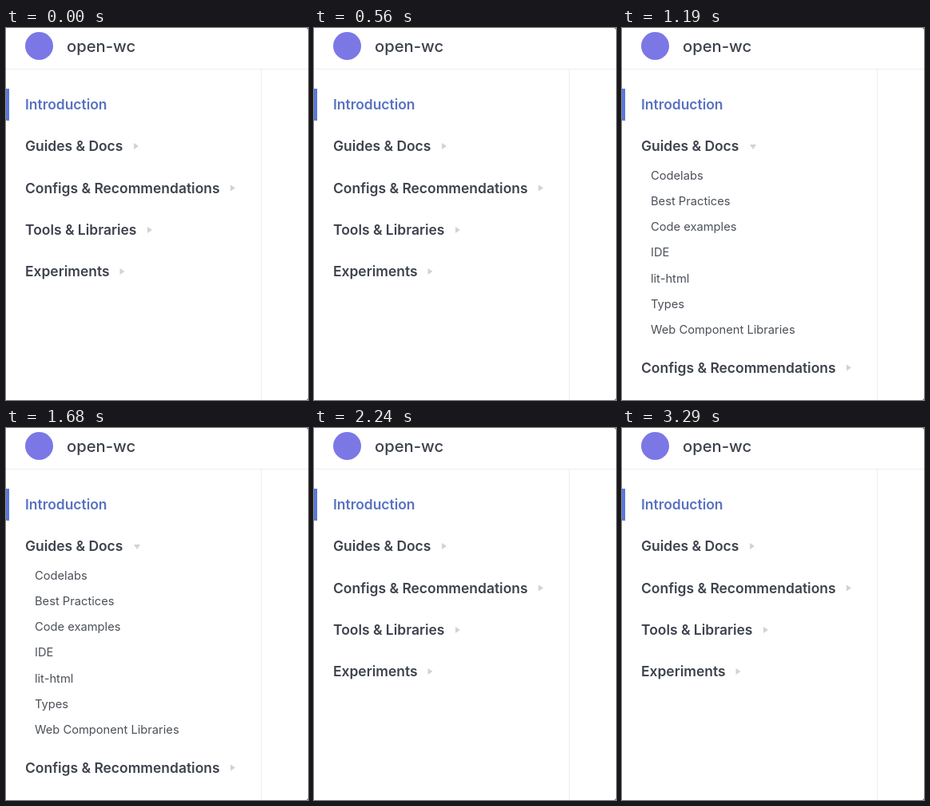
These frames come from a looping animation (378 by 466 pixels, 3.36 s). An HTML page with a canvas:

```html
<!DOCTYPE html>
<html lang="en">
<head>
<meta charset="utf-8">
<title>Sidebar menu</title>
<style>
  html, body { margin: 0; width: 100%; height: 100%; overflow: hidden; background: #fff; }
  canvas { display: block; width: 378px; height: 466px; }
</style>
</head>
<body>
<canvas id="stage"></canvas>
<script>
const W = 378, H = 466, LOOP = 3360;
const OPEN_AT = 1190, CLOSE_AT = 2240;
const FAMILY = 'Inter, "Open Sans", sans-serif';
const INK = '#3d424d', SUB_INK = '#4b5058', ACCENT = '#5872c3', RULE = '#eeeff1';

const groups = [
  { label: 'Guides & Docs', y: 148, arrow: 160 },
  { label: 'Configs & Recommendations', y: 200.5, arrow: 281 },
  { label: 'Tools & Libraries', y: 253, arrow: 177 },
  { label: 'Experiments', y: 305, arrow: 142.5 }
];
const guides = ['Codelabs', 'Best Practices', 'Code examples', 'IDE', 'lit-html',
  'Types', 'Web Component Libraries'];
const ROW = 32.16, UNFOLD = 225;

const canvas = document.getElementById('stage');
const ctx = canvas.getContext('2d');
const scale = window.devicePixelRatio || 1;
canvas.width = W * scale;
canvas.height = H * scale;
ctx.scale(scale, scale);

function text(str, x, baseline, size, weight, color) {
  ctx.font = `${weight} ${size}px ${FAMILY}`;
  ctx.fillStyle = color;
  ctx.fillText(str, x, Math.round(baseline));
}

function rect(x, y, w, h, color) {
  ctx.fillStyle = color;
  ctx.fillRect(x, y, w, h);
}

function shape(color, ...points) {
  ctx.fillStyle = color;
  ctx.beginPath();
  points.forEach(([x, y]) => ctx.lineTo(x, y));
  ctx.fill();
}

function arrow(x, y, down) {
  if (down) shape('#d2d3d5', [x, y - 2], [x + 8, y - 2], [x + 4, y + 4]);
  else shape('#d2d3d5', [x, y - 4], [x + 6, y], [x, y + 4]);
}

function heading(label, y, color) {
  text(label, 24, y + 6, 17.45, 600, color);
}

function header() {
  ctx.fillStyle = '#7b78e6';
  ctx.beginPath();
  ctx.arc(41.5, 22.5, 17.5, 0, Math.PI * 2);
  ctx.fill();
  text('open-wc', 76, 30, 20.2, 500, INK);
  rect(0, 51, W, 1, RULE);
  rect(319, 52, 1, H - 52, RULE);
}

function draw(t) {
  const open = t >= OPEN_AT && t < CLOSE_AT;
  rect(0, 0, W, H, '#fff');
  header();

  rect(0, 76, 4, 40, '#5b78d8');
  heading('Introduction', 96, ACCENT);

  groups.forEach((group, i) => {
    const y = group.y + (open && i > 0 ? UNFOLD : 0);
    heading(group.label, y, INK);
    arrow(group.arrow, y, open && i === 0);
  });
  if (open) {
    guides.forEach((label, i) => text(label, 36, 190 + i * ROW, 14.7, 400, SUB_INK));
  }

  // window corners
  shape('#777', [W - 2, 0], [W, 0], [W, 2]);
  shape('#777', [W, H - 2], [W, H], [W - 2, H]);
}

const start = performance.now();
function tick() {
  draw((performance.now() - start) % LOOP);
  requestAnimationFrame(tick);
}
tick();
</script>
</body>
</html>
```
